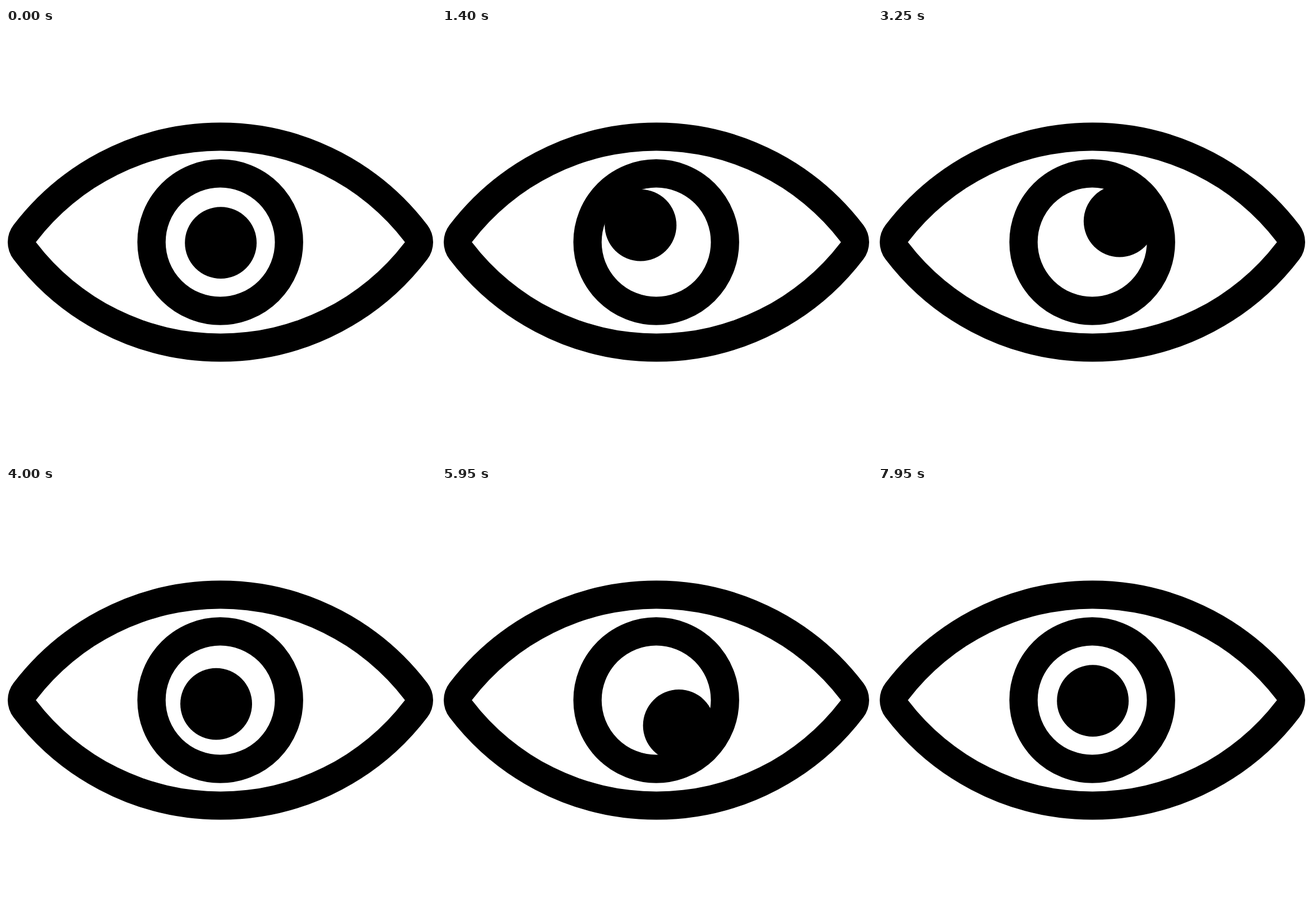
An HTML page that plays this animation: 748x748 px, repeating every 8000 ms.

```html
<!DOCTYPE html>
<html lang="en">
<head>
<meta charset="utf-8">
<title>Looking eye</title>
<style>
  html, body { margin: 0; width: 100%; height: 100%; overflow: hidden; background: #fff; }
  svg { display: block; width: 100%; height: 100%; }
</style>
</head>
<body>
<svg viewBox="0 0 748 748">
  <defs>
    <path id="lens" d="M52 372.5A403.5 403.5 0 0 1 694 372.5A403.5 403.5 0 0 1 52 372.5Z"/>
  </defs>
  <use href="#lens" stroke="#000" stroke-width="98" stroke-linejoin="round"/>
  <use href="#lens" fill="#fff"/>
  <circle cx="372.7" cy="372.5" r="119.6" fill="none" stroke="#000" stroke-width="49.2"/>
  <circle id="pupil" r="62.4"/>
</svg>
<script>
  const LOOP = 8000;
  const HOME = [373.6, 373.6];
  // Each glance: start, end, target position
  const GLANCES = [
    [450, 2000, [337, 334]],
    [2000, 2700, [420.2, 336]],
    [3200, 4700, [328.5, 408.4]],
    [4900, 6400, [422.1, 417.5]],
    [6550, 8050, HOME]
  ];
  const pupil = document.getElementById('pupil');

  const ease = p => p < 0.5 ? 4 * p ** 3 : 1 - 4 * (1 - p) ** 3;
  const clamp = v => Math.min(1, Math.max(0, v));

  function gaze(t) {
    let pos = HOME;
    for (const [start, end, to] of GLANCES) {
      if (t < start) break;
      const k = ease(clamp((t - start) / (end - start)));
      pos = pos.map((v, i) => v + (to[i] - v) * k);
    }
    return pos;
  }

  function draw(t) {
    const [x, y] = gaze(t % LOOP);
    pupil.setAttribute('cx', x.toFixed(2));
    pupil.setAttribute('cy', y.toFixed(2));
  }

  const begin = performance.now();
  function tick() {
    draw(performance.now() - begin);
    requestAnimationFrame(tick);
  }
  tick();
</script>
</body>
</html>
```
